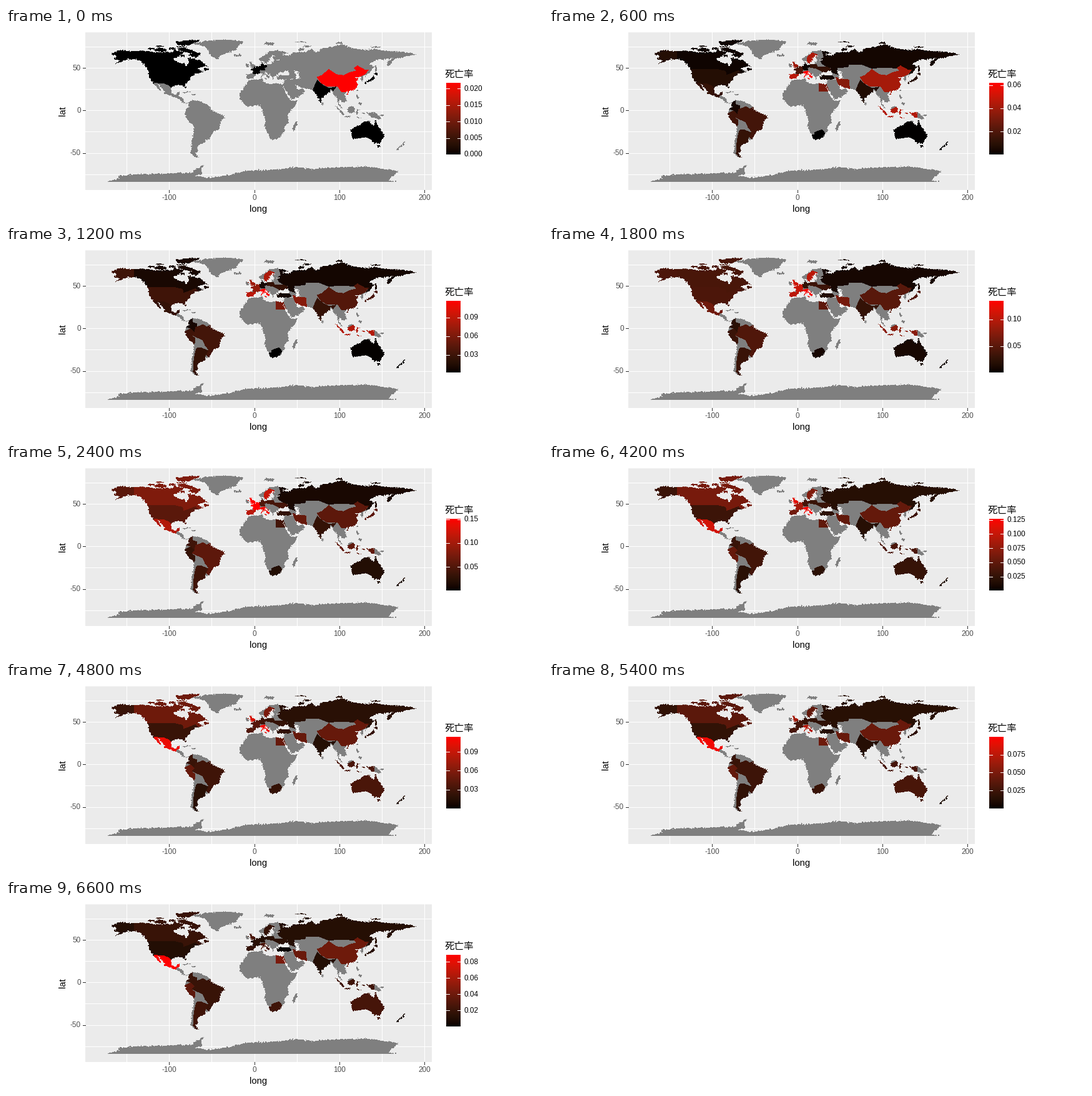
A matplotlib script for the animation above (7.2 s loop, 860x305 px).

```python
import numpy as np
import matplotlib.pyplot as plt
from matplotlib.animation import FuncAnimation
from matplotlib.patches import Rectangle
from matplotlib.path import Path

W, H, DPI = 860, 305, 100
SCALE, X0, Y0 = 1.3626, 397.5, 132.4
LEFT, TOP, WIDTH, HEIGHT = 127, 7, 555, 253

plt.rcParams["font.family"] = ["Liberation Sans", "Noto Sans CJK JP"]
fig = plt.figure(figsize=(W / DPI, H / DPI), dpi=DPI, facecolor="white")
ax = fig.add_axes([0, 0, 1, 1])
ax.axis("off")


def px(lon):
    return X0 + SCALE * lon


def py(lat):
    return Y0 - SCALE * lat


def ramp(t):
    """Black to red, straight through CIE Lab."""
    t = np.asarray(t, float)
    fy = (53.24 * t + 16) / 116
    f = np.stack([fy + 80.09 * t / 500, fy, fy - 67.2 * t / 200], -1)
    xyz = np.where(f > 6 / 29, f ** 3, 3 * (6 / 29) ** 2 * (f - 4 / 29))
    to_rgb = np.array([[3.2406, -1.5372, -0.4986],
                       [-0.9689, 1.8758, 0.0415],
                       [0.0557, -0.204, 1.057]])
    rgb = np.clip(xyz * [0.9505, 1, 1.089] @ to_rgb.T, 0, 1)
    return np.clip(np.where(rgb > 0.0031308,
                            1.055 * rgb ** (1 / 2.4) - 0.055, 12.92 * rgb), 0, 1)


def text(x, y, label, size, color="black", **kw):
    return ax.text(x, y, label, fontsize=size * 72 / DPI, color=color, va="center", **kw)


def line(xs, ys, color="white", z=1):
    return ax.plot(xs, ys, color=color, lw=72 / DPI, antialiased=False,
                   solid_capstyle="butt", zorder=z)[0]


# Panel, grid and axes
ax.add_patch(Rectangle((LEFT, TOP), WIDTH, HEIGHT, fc="#ebebeb", lw=0, zorder=0))
for lon in range(-150, 201, 50):
    line([px(lon)] * 2, [TOP, TOP + HEIGHT])
    if lon % 100 == 0:
        line([px(lon)] * 2, [260, 264], "#333333")
        text(px(lon), 273.5, str(lon), 11.8, "#4d4d4d", ha="center")
for lat in range(-75, 76, 25):
    line([LEFT, LEFT + WIDTH], [py(lat)] * 2)
    if lat % 50 == 0:
        line([123, 127], [py(lat)] * 2, "#333333")
        text(120, py(lat) + 0.5, str(lat), 11.8, "#4d4d4d", ha="right")
text(404.5, 290.5, "long", 14.7, ha="center")
text(91.5, 133, "lat", 14.7, ha="center", rotation=90)

# The map is a grid of cells: -1 sea, 0 land without data, then country numbers
gx, gy = np.meshgrid(LEFT + np.arange(WIDTH) + 0.5, TOP + np.arange(HEIGHT) + 0.5)
lon_grid, lat_grid = (gx - X0) / SCALE, (Y0 - gy) / SCALE
cells = np.full(gx.shape, -1)
rng = np.random.default_rng(4)


def jitter():
    n = rng.normal(0, 0.9, gx.shape)
    return (n + np.roll(n, 1, 0) + np.roll(n, 1, 1) + np.roll(n, (1, 1), (0, 1))) / 4


ragged_lon, ragged_lat = lon_grid + jitter(), lat_grid + jitter()
ragged = np.c_[ragged_lon.ravel(), ragged_lat.ravel()]
exact = np.c_[lon_grid.ravel(), lat_grid.ravel()]


def inside(points, flat):
    return Path(np.reshape(flat, (-1, 2))).contains_points(points).reshape(cells.shape)


def coast(*flat):
    cells[inside(ragged, flat)] = 0


def isle(lon, lat, rx, ry):
    cells[((ragged_lon - lon) / rx) ** 2 + ((ragged_lat - lat) / ry) ** 2 < 1] = 0


# North America
coast(-168, 66, -163, 69.5, -157, 71.3, -141, 69.6, -128, 70.5, -115, 68.5, -96, 68.2,
      -94, 71.5, -82, 69, -87, 64.5, -94, 61, -94, 58.8, -88, 56.5, -82, 55, -80, 51.3,
      -79, 54.5, -76.6, 57, -78, 62.5, -70, 61, -69.5, 59, -64.5, 60.3, -61.5, 57,
      -55.8, 52.5, -66.5, 50, -61, 45.7, -65.5, 43.6, -70, 43.8, -124.5, 47, -130, 55,
      -135, 58.5, -140, 59.8, -148, 60.5, -151.5, 59.2, -164, 54.6, -157.5, 58.5,
      -165.5, 61, -161, 64.5)
coast(-124.5, 48.5, -70, 47, -70, 41.7, -74, 40.7, -75.8, 35.3, -81.2, 31.5, -80.4, 25.2,
      -84, 30, -94, 29.6, -97.4, 27, -97.4, 21, -94, 18.2, -91.5, 18.6, -90.3, 21, -87, 21.5,
      -88.5, 16, -83.2, 15, -83, 10, -77.5, 8.5, -83, 8.3, -87.5, 13, -94.5, 16.2,
      -105.5, 20.3, -105.5, 22.5, -113.5, 31.5, -109.5, 23, -115, 28, -120.6, 34.6, -124.3, 40.4)
coast(-90, 73.5, -80, 73.7, -62, 66.5, -68, 62.3, -78, 65, -73, 67, -89, 71)
coast(-90, 77, -92, 81, -75, 83.2, -62, 82.5, -79, 76.3)
coast(-73, 78.3, -58, 82, -33, 83.5, -12, 81.5, -20, 74.5, -22, 70.5, -38, 66, -43, 60.2,
      -51, 64, -54, 71, -60, 76)
isle(-121, 73, 4, 1.3)
isle(-110, 71.2, 7, 2)
isle(-97, 73, 4, 1)
isle(-111, 75.5, 5, .7)
isle(-85, 75.2, 7, .6)
isle(-84, 64.3, 3, 1.2)
isle(-56, 48.8, 3, 1.8)
isle(-79, 21.7, 5, .7)
isle(-71.3, 18.9, 3, .8)

# South America, Africa, Antarctica
coast(-77.5, 8.5, -72, 12, -62, 10.7, -52, 4.5, -50, 0, -44, -2.5, -35.3, -5.5, -35, -8.5,
      -39, -13, -41, -22, -48.5, -26, -52, -33, -58, -34.2, -57, -37, -65, -41, -67.5, -46,
      -65.8, -47.5, -69, -51, -65.3, -54.7, -69, -55.5, -75, -50, -73, -37, -70.3, -18.3,
      -76.2, -14, -81.2, -5, -80, 1, -77.3, 5)
coast(-6, 35.8, 10, 37.3, 10, 34, 20, 30.5, 23, 32.6, 32.5, 31.2, 37.3, 19, 43, 12, 51, 11.9,
      48, 5, 39.2, -5, 40.6, -15, 35, -20, 35.5, -24, 30.5, -31, 26, -33.8, 20, -34.8,
      18, -32, 11.8, -17, 13.7, -11, 9, -1, 9.7, 4, 4, 6.3, -7.5, 4.4, -13, 8.8,
      -17, 13, -17, 21, -10, 30)
coast(49.3, -12, 50.4, -15.7, 47.2, -25, 44, -22)
coast(-178, -85.5, -158, -80, -160, -77.5, -146, -75.5, -74, -73.3, -68, -69, -58, -63.3,
      -62, -68, -61, -75, -70, -77, -55, -79.5, -28, -76, -10, -71, 32, -69, 50, -66.5,
      70, -69.5, 81, -67.5, 135, -66, 170, -71.7, 158, -82, 175, -85)
cells[lat_grid < -84.3] = -1

# Europe and Asia
coast(-9.2, 43, -1.7, 43.4, -1.2, 46, -4.7, 48.4, 1.6, 50.9, 8, 53.7, 8.2, 57, 10.5, 57.3,
      11, 54.2, 20, 54.6, 24, 59.3, 50, 60, 47, 47, 50, 40.4, 49, 37.5, 36, 36.5, 27.5, 37,
      26.3, 39.5, 29, 41.2, 41.5, 41.6, 39, 47, 33.5, 44.5, 30.5, 46.3, 28, 42.5, 23, 40.5,
      22.7, 36.6, 19.4, 41, 13.5, 45.7, 12.4, 44, 18.5, 40.2, 16, 38, 10.3, 43.5, 7, 43.8,
      3, 43, -2, 36.8, -9, 37)
coast(5, 61, 10, 64, 18, 69.5, 28, 71, 41, 67, 33, 66.7, 38, 64, 31, 60, 23, 60, 21.5, 62,
      25, 65, 21.5, 64.5, 17.3, 61, 19, 60, 14.2, 55.5, 12.8, 55.5, 10.5, 59.2, 7.5, 58)
coast(36, 64, 44, 66, 44, 68.3, 60, 69, 68, 72.5, 73, 68, 80, 73, 104, 77.6, 113, 74, 130, 71,
      140, 72.3, 160, 69.6, 180, 69, 190, 66, 163, 60, 162, 56, 157, 51.2, 156, 57,
      163, 61.5, 143, 59.3, 135.5, 54.5, 141, 52, 135, 43.5, 127.5, 39.5, 129, 35.5,
      126.5, 34.5, 125, 39.5, 118, 39.2, 122.5, 37, 119.3, 35, 122, 30, 118, 24, 108, 21.5,
      106, 19, 109, 11.5, 105, 9, 100, 13.4, 99.5, 9.5, 104, 1.4, 98.3, 8, 97, 17, 94.5, 16,
      91, 22.5, 87, 21, 80.2, 15, 78, 8.2, 73, 19, 67, 24.8, 57, 26.8, 48, 30, 51.5, 25,
      56.2, 26, 59.8, 22.5, 52, 15.7, 44, 12.8, 39, 21, 33, 29.5, 36, 36.5, 54, 37, 51, 44.5,
      53, 46, 47, 47, 30, 60)
coast(-5, 58.6, -2, 57.5, -3, 56, 1.7, 52.7, 1, 51, -5.5, 50.1, -3, 51.5, -5, 52, -3, 53.5, -5, 55)
coast(131, 34.2, 137, 37, 140, 41.2, 141.8, 39.5, 140.5, 35.5, 135.5, 33.7)
isle(-18.8, 65, 5, 1.4)
isle(18, 78.6, 6, 1.4)
isle(-8, 53.2, 2, 1.9)
isle(14, 37.5, 1.5, .7)
isle(9, 40.6, .8, 1.6)
isle(55, 72, 3, 1.4)
isle(62, 75.6, 5, 1)
isle(100, 79.5, 4, 1.2)
isle(143, 74.6, 6, .8)
isle(55, 80.7, 7, .5)
isle(142.8, 50, .9, 4)
isle(142.8, 43.4, 2.2, 1.3)
isle(130.8, 32.4, 1, 1.4)
isle(121, 23.7, .8, 1.3)
isle(109.7, 19.2, .9, .8)
isle(80.7, 7.6, .9, 1.5)
isle(121.2, 16, 1.2, 2.5)
isle(124.3, 8, 2, 1.7)

# Islands of the south-east and Oceania
coast(95.3, 5.6, 104, -1.5, 105.8, -5.8, 102, -4)
coast(131, -.7, 135, -3.3, 138, -1.6, 145, -4.3, 150.8, -10.5, 143, -9, 138, -8.3, 133, -3.8)
coast(113.5, -22, 115.7, -34, 124, -33, 131, -31.5, 138, -35, 140.5, -38, 147, -39,
      153.3, -30, 146, -19, 142.5, -10.8, 140.5, -17.6, 135.5, -15, 136.5, -12.2, 130, -13,
      122.2, -18)
coast(172.7, -40.6, 174.2, -41.7, 168.5, -46.6, 166.5, -45.8)
isle(114, .7, 4.6, 3.8)
isle(110, -7.4, 4.7, .7)
isle(120.5, -2.5, 1.2, 3)
isle(122.5, .8, 2.5, .5)
isle(122, -8.7, 4, .5)
isle(128.5, -3.2, 1.8, .5)
isle(150.5, -5.5, 2, .6)
isle(146.6, -42.2, 1.7, 1.3)
isle(175.8, -38.8, 1.6, 2.4)

KEYS = [2, 4, 6, 8, 11]
countries = []


def country(levels, *border, start=None):
    """Shade the land within a border; start is the opening shade, None for no data."""
    countries.append((levels, start))
    cells[inside(exact, border) & (cells >= 0)] = len(countries)


country((.25, .37, .25, .22, .12), -172, 24, -172, 72, -66, 72, -66, 24, start=0)
country((.07, .52, .53, .45, .22), -141, 60.3, -141, 84, -60, 83, -75, 78, -60, 70, -50, 50,
        -60, 43, -67, 44.8, -69, 47.3, -75, 45, -83, 42, -84, 46.5, -95, 49, -128, 49,
        -131, 55, -137.5, 58.9, start=0)
country((.2, .72, .75, .93, 1), -117.5, 32.5, -106.5, 31.8, -101, 29.8, -97, 25.9, -86, 22,
        -88, 17.9, -91, 17.5, -92.2, 14.6, -110, 15, -120, 28)
country((.06, .25, .22, .22, .22), -80, 1.5, -77.3, 8, -72, 13, -72, 7.3, -67.5, 6, -67, 1.5,
        -70, -4.2, -75, 0)
country((.25, .2, .42, .42, .38), -82, -3.4, -75, 0, -70, -4.2, -73.5, -8, -69.5, -11,
        -69.5, -17, -72, -20, -83, -8)
country((.27, .38, .28, .25, .22), -70, -4.2, -69.5, 1.5, -60, 5, -56, 2.3, -50, 5, -30, 0,
        -33, -20, -53.5, -34, -57.6, -30.2, -54, -25, -58, -20, -60.5, -14, -73.5, -8)
country((.2, .25, .15, .15, .25), -68, -23, -62.5, -22.2, -54, -26, -58, -34, -50, -45,
        -65, -56, -68.6, -55, -72, -51, -71.5, -40, -70, -30)
country((.5, .27, .37, .42, .5), 25, 22, 25, 33, 34, 32, 38, 22)
country((0, .12, .13, .2, .25), 15, -28.6, 20, -28.4, 20, -25.5, 29.5, -22.2, 33, -27,
        33, -36, 15, -36)
country((.05, .07, .12, .15, .13), 28, 56, 27.5, 60, 31, 63, 29, 70, 40, 83, 195, 82, 195, 60,
        155, 48, 131, 42.5, 135, 48.4, 131, 47.7, 121, 53.3, 117, 49.6, 98, 50.5, 88, 49,
        77, 53.5, 61, 54, 60, 51, 47, 50, 48.3, 42, 37, 45.5, 40, 49.5, 32, 52.5)
country((.34, .38, .4, .42, .45), 73.6, 39.5, 80, 42, 87.5, 49, 96.5, 42.7, 105, 41.6, 112, 45,
        120, 47, 117, 49.6, 121, 53.3, 131, 47.7, 135, 48.4, 131, 43, 122, 38.5, 124, 32,
        118, 22, 109, 18, 108, 21.5, 102, 22, 98, 28, 86, 28, 78.5, 32, 75, 37, start=1)
country((.2, .2, .15, .13, .12), 74, 36, 81, 30, 88, 26.5, 97, 28.2, 93, 23, 89, 26, 89, 21,
        82, 12, 78, 7, 68, 22, 70, 27.5, start=0)
country((.55, .42, .38, .42, .43), 44.5, 39.5, 54, 37.3, 61, 36.5, 62, 25, 54, 26.2, 48.5, 29.8)
country((.05, .18, .15, .18, .02), 26, 42, 41.5, 41.5, 44.5, 37.2, 36.5, 36, 26, 36)
country((.3, .38, .3, .2, .15), 129.6, 30, 146, 30, 146, 45, 140, 45, 130, 34.5, start=0)
country((.01, .12, .12, .3, .28), 112, -10.7, 155, -10.7, 155, -45, 112, -45, start=0)
country((.72, .4, .3, .3, .25), 95, 6, 104, .5, 110, 1, 116, 4.2, 128, 4, 141, 0, 141, -9.3,
        118, -10, 100, -9)
country((0, .08, .1, .12, .05), 165, -34, 180, -34, 180, -48, 165, -48)
country((.7, .8, .55, .5, .2), 11, 59, 12, 64, 18, 68.4, 24, 66, 19, 57, 13, 55)
country((.65, 1, .97, .85, .3), -6, 49.8, 1.5, 51.1, 3, 60, -8, 60, -8, 54.3, -5.5, 54)
country((.75, .75, .6, .33, .2), -10, 44, 3.3, 42.4, -1, 36, -10, 36)
country((.6, 1, 1, .35, .15), -5, 49, 5, 54, 8, 49, 6.5, 46, 7.5, 43.5, 3, 42.4, -1.7, 43.3,
        start=0)
country((1, .95, 1, .95, .3), 7, 43.8, 7, 45.9, 12, 47, 13.7, 46, 19, 40, 15, 36.5, 8, 39)
country((.2, .28, .25, .2, .15), 14.5, 54.5, 23, 54.5, 24, 51.8, 34, 52, 40, 49, 37, 45,
        30, 45, 23, 49, 15, 50.5)
country((.06, .33, .3, .25, .12), 6, 50, 7, 54, 9.5, 55, 14.5, 54.5, 15, 51, 12.3, 50.2,
        13, 47.6, 7.6, 47.6, start=0)

# Colour bar
BAR_TOP, BAR_END, BAR_LEFT, BAR_RIGHT = 88, 203, 705, 728
HIGH = [.0217, .062, .117, .135, .151, .147, .1415, .127, .1138, .0997, .094, .0885]
STEP = [.005, .02, .03, .05, .05, .05, .05, .025, .03, .025, .025, .02]
LOW = {0: 0, 2: .002, 6: .0012}
text(703, 74.5, "死亡率", 15.5)


def picture(pixels, x0, x1, y0, y1):
    return ax.imshow(pixels, extent=(x0, x1, y1, y0), aspect="auto",
                     interpolation="nearest", zorder=2)


picture(ramp(np.linspace(1, 0, 115))[:, None, :], BAR_LEFT, BAR_RIGHT, BAR_TOP, BAR_END)
world = picture(np.zeros(cells.shape + (4,)), LEFT, LEFT + WIDTH, TOP, TOP + HEIGHT)
ax.set(xlim=(0, W), ylim=(H, 0))
marks = []


def shade(i, levels, start):
    if i == 0 and start is None:
        return [127 / 255] * 3
    first = levels[0] if start is None else start
    return ramp(np.interp(i, [0] + KEYS, (first,) + levels))


def update(i):
    palette = np.ones((len(countries) + 2, 4))
    palette[0, 3] = 0
    palette[1, :3] = 127 / 255
    palette[2:, :3] = [shade(i, *c) for c in countries]
    world.set_data(palette[cells + 1])
    while marks:
        marks.pop().remove()
    low, high, step = LOW.get(i, .0002), HIGH[i], STEP[i]
    digits = 3 if step in (.005, .025) else 2
    for k in range(int(high / step) + 1):
        value = k * step
        if value >= low:
            y = BAR_END - (value - low) / (high - low) * (BAR_END - BAR_TOP)
            marks.append(line([BAR_LEFT, BAR_LEFT + 4.6], [y, y], z=4))
            marks.append(line([BAR_RIGHT - 4.6, BAR_RIGHT], [y, y], z=4))
            marks.append(text(734, y + 0.5, f"{value:.{digits}f}", 11.8))
    return [world] + marks


anim = FuncAnimation(fig, update, frames=12, interval=600, repeat=True, repeat_delay=0)
plt.show()
```
